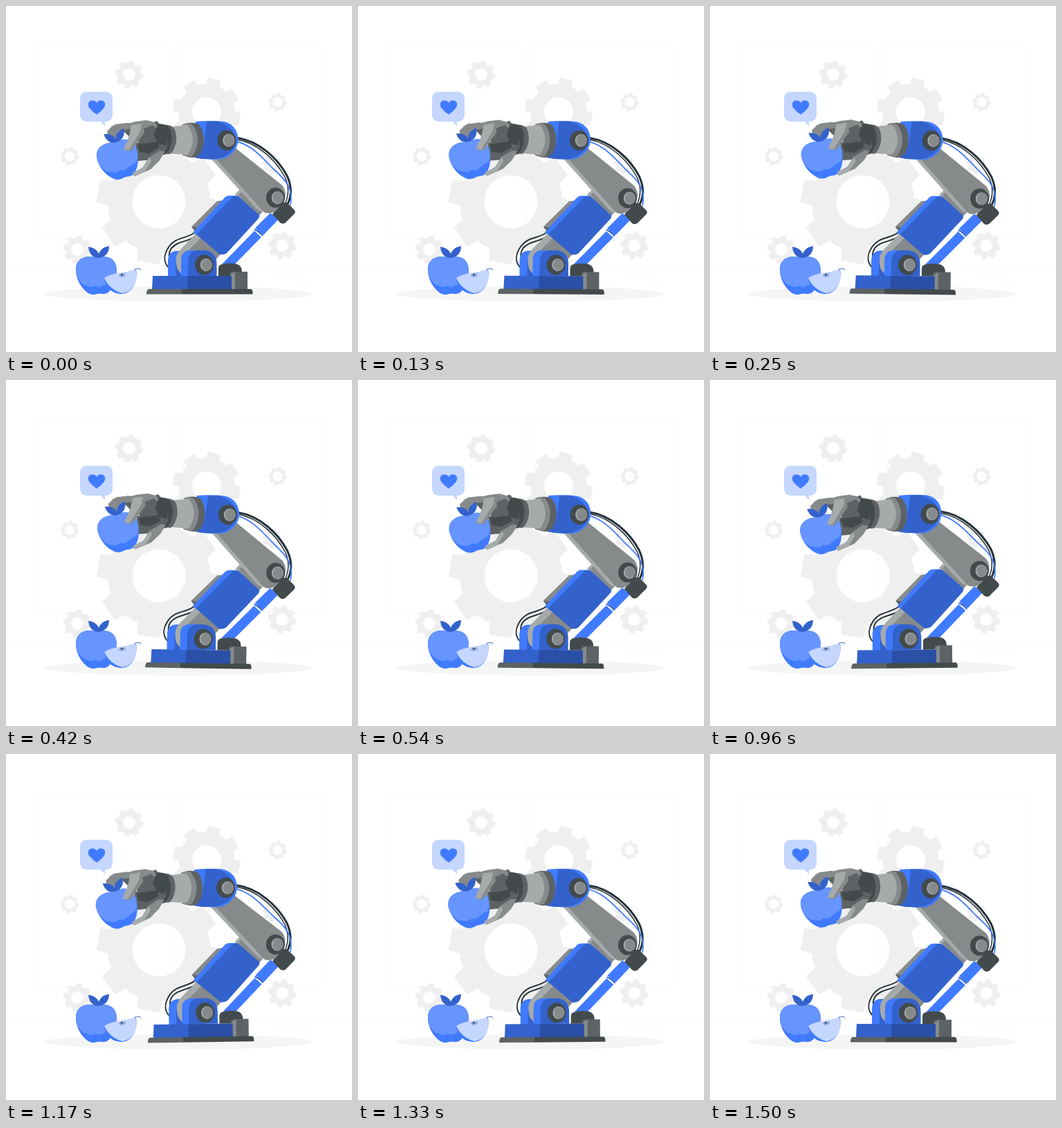
Write an HTML page with a canvas that moves like this. It is 500x500 px and loops after 1.54 s.

```html
<!DOCTYPE html>
<html lang="en">
<head>
<meta charset="utf-8">
<title>Robot arm</title>
<style>
html, body { margin: 0; width: 100%; height: 100%; overflow: hidden; background: #fff; }
canvas { display: block; width: 500px; height: 500px; }
</style>
</head>
<body>
<canvas id="stage"></canvas>
<script>
const LOOP = 1540, SWING = 1500, STEP = 1000 / 24;
const PIVOT = [275.5, 290.5];
const BLUE = '#407bff', MID = '#3362cc', DEEP = '#2a4fa6', SKY = '#6695ff', PALE = '#c5d7ff';
const SILVER = '#a6aaab', GREY = '#868a8b', STEEL = '#5d6364', COAL = '#434a4c', INK = '#263238';
const MIST = '#efefef', HAZE = '#f5f5f5', FAINT = '#fafafa';

const canvas = document.getElementById('stage');
const ctx = canvas.getContext('2d');
const ratio = window.devicePixelRatio || 1;
canvas.width = canvas.height = 500 * ratio;

function fill(color, d) {
  ctx.fillStyle = color;
  ctx.fill(new Path2D(d));
}

function line(color, width, d) {
  ctx.strokeStyle = color;
  ctx.lineWidth = width;
  ctx.stroke(new Path2D(d));
}

function oval(color, x, y, rx, ry = rx, turn = 0) {
  ctx.fillStyle = color;
  ctx.beginPath();
  ctx.ellipse(x, y, rx, ry, turn, 0, Math.PI * 2);
  ctx.fill();
}

function gear(x, y, r, hole, offset) {
  const root = r * 0.82;
  ctx.beginPath();
  for (let i = 0; i < 8; i++) {
    const mid = (offset + i * 45) * Math.PI / 180;
    for (const [turn, radius] of [[-0.25, root], [-0.18, r], [0.18, r], [0.25, root]]) {
      ctx.lineTo(x + radius * Math.cos(mid + turn), y + radius * Math.sin(mid + turn));
    }
    ctx.arc(x, y, root, mid + 0.25, mid + Math.PI / 4 - 0.25);
  }
  ctx.closePath();
  ctx.moveTo(x + hole, y);
  ctx.arc(x, y, hole, 0, Math.PI * 2, true);
  ctx.fillStyle = MIST;
  ctx.fill();
}

function apple(x, y, turn) {
  ctx.save();
  ctx.translate(x, y);
  ctx.rotate(turn * Math.PI / 180);
  fill(BLUE, 'M0-26C10-30 29-29 29-8C29 7 23 20 15 25C10 27 6 25 1 26C-5 28-11 27-16 22C-25 14-30 2-30-9C-30-29-9-30 0-26Z');
  fill(SKY, 'M0-26C10-30 29-29 29-8C29 1 26 9 20 10C16 10 15 13 11 13C6 17 1 16-3 14C-9 19-14 13-18 13C-25 9-30 0-30-9C-30-29-9-30 0-26Z');
  fill(MID, 'M1-26C-7-27-11-33-12-42C-4-41 1-37 3-32C6-39 11-42 18-43C18-33 12-26 1-26Z');
  ctx.restore();
}

function slice() {
  fill(BLUE, 'M142 393C144 407 153 416 167 416C182 416 191 398 188 381Z');
  fill(PALE, 'M142 393C155 384 172 387 187 380C192 396 184 413 168 415C156 412 147 404 142 393Z');
  oval('#93aee8', 168, 389, 5, 2.8, -0.2);
  oval(COAL, 167.5, 388.5, 1.8, 1.2, -0.3);
  line(MID, 1.2, 'M186 381Q191 378 195 381');
}

function joint(x, y) {
  oval(COAL, x, y, 13.5, 14.5);
  oval(SILVER, x + 2.8, y, 8.6, 9.2);
  oval(GREY, x + 3.8, y, 7.6, 8.4);
}

function backdrop() {
  ctx.lineWidth = 1;
  ctx.strokeStyle = FAINT;
  ctx.strokeRect(39.5, 55.5, 203, 282);
  ctx.strokeRect(255.5, 55.5, 203, 282);
  line(FAINT, 1, 'M0 382.5H500M388 390.5H433M415 398.5H448');
  gear(178, 99, 20.5, 9, 10);
  gear(290, 153, 49.5, 21, 13);
  gear(392.5, 139, 13.5, 7, 10);
  gear(92, 217, 13.5, 7, 10);
  gear(385, 229, 14, 6, 10);
  gear(221, 283, 90.5, 38.5, 10);
  gear(103, 352, 20.5, 9, 10);
  gear(399, 346, 20.5, 9, 10);
  oval(HAZE, 249.5, 416, 193.5, 11);
}

function bubble() {
  ctx.fillStyle = PALE;
  ctx.beginPath();
  ctx.roundRect(107, 124, 47, 43, 9);
  ctx.fill();
  fill(PALE, 'M136 166L143 174V166Z');
  fill(BLUE, 'M131 157C128 154 125 153 122 149C116 143 119 136.500 125 136.500C128 136.500 130 138 131 140C132 138 134 136.500 137 136.500C143 136.500 146 143 140 149C137 153 134 154 131 157Z');
}

function cables() {
  line(INK, 2, 'M272 328C258 337 246 334 236 347C229 357 226 369 235 378');
  line(INK, 2, 'M272 334C258 342 248 340 239 350C235 356 234 364 240 370');
  line(INK, 3, 'M334 190.500C366 195 393 221 406 245C413 260 413 274 407 286');
  line(INK, 1.5, 'M334 193C364 198 390 223 403 247C409 260 409 272 404 284');
  line(BLUE, 1.8, 'M330 195C354 199 371 220 387 236C404 251 416 264 411 288');
}

function base() {
  fill(COAL, 'M307 385V379Q307 373 314 373Q319 371 329 372Q341 373 341 384V390H307Z');
  fill(STEEL, 'M324 384H349V410H324Z');
  fill(GREY, 'M324 388L331 384V410H324Z');
  fill(MID, 'M235 391V366Q236 353 250 354L264 359V391Z');
  fill(BLUE, 'M234 391V367Q235 355 246 354Q251 355 250 362L245 367V391Z');
  fill(DEEP, 'M262 390H326V410H254Z');
  fill(MID, 'M212 390H262V410H211Z');
  fill(STEEL, 'M206 409H260L254 416.500H203Q203 410 206 409Z');
  fill(COAL, 'M254 409H354Q357 410 356.500 416.500H254Z');
}

function piston() {
  fill(BLUE, 'M312 373L359 325L369 334L322 382Z');
  fill(BLUE, 'M360 321L382 299L394 308L372 331Z');
  line(MID, 2, 'M359 323Q365 325 371 332');
}

function lowerArm() {
  fill(GREY, 'M268 319L305 282L319 280L277 327Z');
  fill(STEEL, 'M268 319L277 320L315 281L319 280L275 328Z');
  fill(SILVER, 'M331 272L340 263L371 293L361 303Z');
  fill(GREY, 'M336 273L344 265L374 294L363 306Z');
  fill(SILVER, 'M248 381C244 369 245 359 252 352L275 328L312 354L288 385L256 390Z');
  fill(GREY, 'M259 384C254 368 256 361 264 353L284 333L314 354L301 369L288 388Z');
  fill(BLUE, 'M270 327L315 278Q318 274 323 274H335L279 333Z');
  fill(MID, 'M275 330L327 276Q329 274 336 275L366 302Q367 304 365 307L319 357Q315 360 309 359Z');
  fill(BLUE, 'M253 390V367Q253 354 266 353H284V390Z');
  fill(MID, 'M263 390V368Q264 354 278 353H286Q304 354 304.500 372V390Z');
  joint(286.5, 374);
}

function upperArm() {
  fill(COAL, 'M385 301L397 284H406L417 295Q419 298 416 301L404 313Q400 316 396 313Z');
  fill(SILVER, 'M293 217L306 209L374 297Q367 299 361 292Z');
  fill(GREY, 'M300 217L330 204L399 259Q407 269 402 282L390 296Q381 302 373 298Z');
  joint(389.5, 277);
  fill(BLUE, 'M274 167Q295 165 315 167Q335 172 335.500 194Q334 213 313 221Q292 223 272 219Z');
  fill(MID, 'M290 167L305 166.500Q324 172 329 184L330 204Q322 218 303 221Q285 222 273 219Q286 208 287 194Z');
  joint(319, 194);
}

function wrist() {
  fill(STEEL, 'M259 170Q270 167 279 171Q286 180 286 194Q285 210 277 217Q270 221 259 217Z');
  fill(GREY, 'M255 171Q262 168 269 171Q277 181 277 194Q276 209 269 217Q263 219 255 216Z');
  fill(SILVER, 'M234 175L262 172Q270 181 270 194Q269 207 262 215L234 213Z');
  fill(STEEL, 'M228 172Q238 171 243 177Q247 185 246 196Q243 210 237 214H228Z');
  fill(COAL, 'M216 171Q230 169 235 175Q241 184 239 197Q237 210 229 215L216 214Z');
}

function backHand() {
  fill(STEEL, 'M153 175L174 169L189 171L186 186L177 188L169 180L158 180Z');
  fill(GREY, 'M151 175L158 171L174 169L188 170L184 177L165 180Z');
  fill(GREY, 'M146 181L152 175L163 179L166 187L156 191L147 187Z');
  fill(STEEL, 'M187 198L207 195L222 212L212 222L190 224Z');
}

function frontHand() {
  fill(STEEL, 'M190 178L218 166L232 182L233 204L222 221L206 224L192 210Z');
  fill(COAL, 'M210 177L223 170L234 184L231 202L219 198Z');
  fill(COAL, 'M190 200L219 196L222 204L207 213L193 211Z');
  fill(GREY, 'M176 170L187 167L203 165L215 168L219 174L211 181L196 183L192 173Z');
  fill(STEEL, 'M197 178L212 172L217 178L211 193L194 199Z');
  fill(GREY, 'M206 219L222 209L230 210L222 223L209 236L186 246L183 242L197 235Z');
  fill(SILVER, 'M207 219L210 224L201 239L185 246L183 241L198 233Z');
  fill(GREY, 'M182 171L198 171L200 183L181 209L172 209Z');
  fill(SILVER, 'M181 172L196 170L194 181L178 208L170 208L172 201L178 190Z');
}

function robot(angle) {
  ctx.save();
  ctx.translate(...PIVOT);
  ctx.rotate(angle * Math.PI / 180);
  ctx.translate(-PIVOT[0], -PIVOT[1]);
  cables();
  piston();
  base();
  lowerArm();
  upperArm();
  wrist();
  backHand();
  apple(163, 223, -14);
  frontHand();
  ctx.restore();
}

// Sway: 0 to +1 degree, down to -1, back to 0, in 24 steps per second.
function swayAt(time) {
  const tick = Math.floor((Math.floor(time / 10) * 10 + 4.9) / STEP);
  const p = (tick * STEP / SWING) % 1;
  if (p < 0.25) return p * 4;
  return p < 0.75 ? 2 - p * 4 : p * 4 - 4;
}

function draw(now) {
  ctx.setTransform(ratio, 0, 0, ratio, 0, 0);
  ctx.fillStyle = '#fff';
  ctx.fillRect(0, 0, 500, 500);
  backdrop();
  bubble();
  apple(131, 390, 0);
  slice();
  robot(swayAt((now - start) % LOOP));
}

function tick() {
  draw(performance.now());
  requestAnimationFrame(tick);
}

const start = performance.now();
tick();
</script>
</body>
</html>
```
